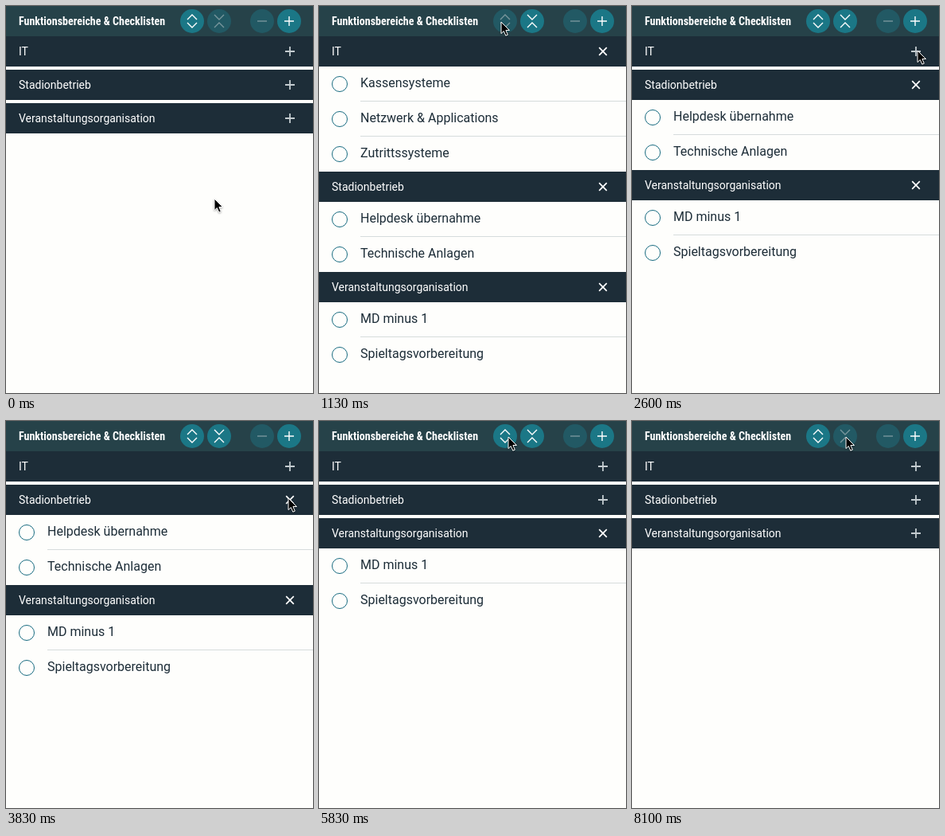
An HTML page for the animation above (8.26 s loop, 386 by 486 pixels).

```html
<!DOCTYPE html>
<html lang="de">
<head>
<meta charset="utf-8">
<title>Checklisten</title>
<style>
  html, body { margin: 0; width: 100%; height: 100%; overflow: hidden; }
  body { position: relative; background: #fefefc; font-family: Roboto, sans-serif; }

  header { position: relative; height: 38px; background: #264249; }
  h1 {
    margin: 0; padding-left: 16px; color: #fff; white-space: nowrap;
    font: 700 14px/38px "Roboto Condensed", Roboto, sans-serif; font-stretch: 75%;
  }
  svg { position: absolute; fill: none; overflow: visible; }
  .btn { top: 4px; width: 30px; height: 30px; stroke: #fff; stroke-width: 1.4; }
  .btn circle { fill: #1b7786; stroke: none; }
  .btn g { opacity: calc(1 - var(--off, 0)); }
  .btn .dim { opacity: var(--off, 0); }
  .dim circle { fill: #225964; }
  .dim path { stroke: #78969c; }

  section { --o: 0; margin-bottom: calc(4px * (1 - var(--o))); }
  h2 {
    position: relative; margin: 0; height: 38px; padding-left: 16px;
    background: #1d2d38; color: #fff; font: 400 14px/38px Roboto, sans-serif;
  }
  h2 svg { left: 349px; top: 11px; width: 16px; height: 16px; }
  .plus { stroke: #c3cbcf; stroke-width: 1.8; opacity: calc(1 - var(--o)); }
  .cross { stroke: #fff; stroke-width: 1.7; opacity: var(--o); }
  ul {
    margin: 0; padding: 0; list-style: none; overflow: hidden;
    height: calc(var(--o) * var(--n) * 44px);
  }
  li {
    position: relative; box-sizing: border-box; height: 44px; padding-left: 52px;
    color: #1d2d38; font-size: 16px; line-height: 42px;
  }
  li::before {
    content: ""; position: absolute; left: 16px; top: 12px; width: 18px; height: 18px;
    border: 1px solid #176b80; border-radius: 50%;
  }
  li:not(:last-child)::after {
    content: ""; position: absolute; left: 52px; right: 0; bottom: 0; height: 1px; background: #d6dcdc;
  }

  .it { animation: it 8260ms step-end infinite; }
  .stadium { animation: stadium 8260ms step-end infinite; }
  .event { animation: event 8260ms step-end infinite; }
  .expand { animation: expand 8260ms step-end infinite; }
  .collapse { animation: collapse 8260ms step-end infinite; }
  @keyframes it { 0%, 31.477%, 87.893%, 100% { --o: 0 } 13.68%, 71.429% { --o: 1 } }
  @keyframes stadium { 0%, 48.426%, 87.893%, 100% { --o: 0 } 13.68%, 71.429% { --o: 1 } }
  @keyframes event { 0%, 87.893%, 100% { --o: 0 } 13.68% { --o: 1 } }
  @keyframes expand { 0%, 31.477%, 87.893%, 100% { --off: 0 } 13.68%, 71.429% { --off: 1 } }
  @keyframes collapse { 0%, 87.893%, 100% { --off: 1 } 13.68% { --off: 0 } }

  #cursor { left: 0; top: -1px; width: 12px; height: 19px; filter: drop-shadow(0 1px 1px #0005); }
</style>
</head>
<body>
<header>
  <h1>Funktionsbereiche &amp; Checklisten</h1>
  <svg class="btn expand" style="left:219px"><g><circle cx="15" cy="15" r="15"/><path d="M9 13l6-6 6 6M9 17l6 6 6-6"/></g></svg>
  <svg class="btn collapse" style="left:253px"><g><circle cx="15" cy="15" r="15"/><path d="M9 7l6 6 6-6M9 23l6-6 6 6"/></g></svg>
  <svg class="btn" style="left:307px;--off:1"><g><circle cx="15" cy="15" r="15"/><path d="M9 15h12"/></g></svg>
  <svg class="btn" style="left:341px"><g><circle cx="15" cy="15" r="15"/><path d="M9 15h12M15 9v12"/></g></svg>
</header>
<main></main>
<svg id="cursor"><path d="M0 0V14.6L3.3 11.5 5.8 17.2 8.3 16.1 5.9 10.5H10.5Z" fill="#000" stroke="#fff"/></svg>
<script>
  const LOOP = 8260;
  const areas = [
    ['it', 'IT', ['Kassensysteme', 'Netzwerk &amp; Applications', 'Zutrittssysteme']],
    ['stadium', 'Stadionbetrieb', ['Helpdesk übernahme', 'Technische Anlagen']],
    ['event', 'Veranstaltungsorganisation', ['MD minus 1', 'Spieltagsvorbereitung']]
  ];
  document.querySelector('main').innerHTML = areas.map(([cls, title, items]) => `
    <section class="${cls}" style="--n:${items.length}">
      <h2>${title}<svg class="plus"><path d="M2 8h12M8 2v12"/></svg><svg class="cross"><path d="M3.2 3.2l9.6 9.6M12.8 3.2L3.2 12.8"/></svg></h2>
      <ul>${items.map(text => `<li>${text}</li>`).join('')}</ul>
    </section>`).join('');

  // Each button carries a dimmed twin for its disabled look.
  document.querySelectorAll('.btn g').forEach(g => {
    const twin = g.cloneNode(true);
    twin.setAttribute('class', 'dim');
    g.after(twin);
  });

  // Pointer route: time, x, y, easing towards the next stop.
  const route = [
    [0, 262, 243], [20, 262, 243, 'ease-in'], [330, 243, 125, 'ease-out'],
    [620, 225, 8, 'ease-in-out'], [760, 229, 21],
    [1270, 229, 21, 'ease-in-out'], [1390, 234, 18, 'ease-in-out'],
    [2100, 350, 58], [2140, 350, 58, 'ease-out'], [2330, 359, 57],
    [2900, 359, 57, 'ease-in-out'], [3350, 353, 110, 'ease-in-out'], [3700, 354, 98],
    [3829, 354, 98, 'step-end'], [3830, 355, 98],
    [4170, 355, 98, 'ease-in-out'], [4780, 246, 8, 'ease-in-out'], [5000, 236, 23],
    [5120, 236, 23], [5190, 234, 24], [5300, 238, 21],
    [6200, 238, 21, 'ease-out'], [6340, 253, 7, 'ease-in'], [6500, 271, 21],
    [6829, 271, 21, 'step-end'], [6830, 268, 22, 'step-end'], [6900, 269, 21],
    [8260, 269, 21]
  ];
  const frames = route.map(([t, x, y, easing = 'linear']) =>
    ({ offset: t / LOOP, transform: `translate(${x}px, ${y}px)`, easing }));
  document.getElementById('cursor').animate(frames, { duration: LOOP, iterations: Infinity });
  document.getAnimations().forEach(a => { a.startTime = 0; });
</script>
</body>
</html>
```
